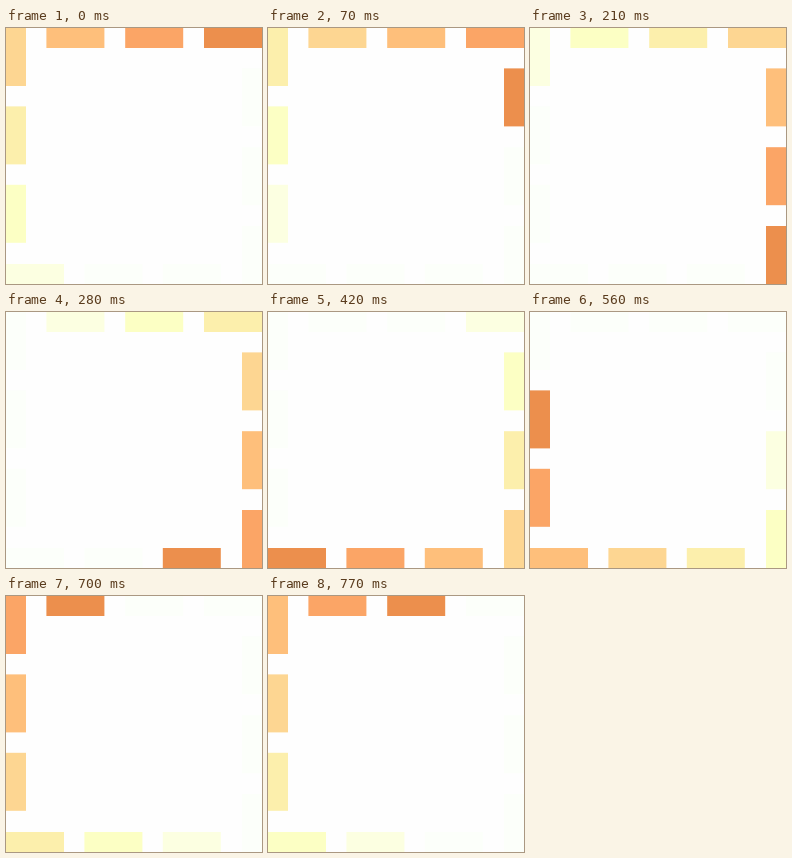
These frames come from a looping animation (256x256 px, 840 ms). An HTML page with a canvas:

```html
<!DOCTYPE html>
<html>
<head>
<meta charset="utf-8">
<style>
  html, body { margin: 0; width: 100%; height: 100%; overflow: hidden; background: #fefefe; }
  canvas { display: block; width: 100%; height: 100%; }
</style>
</head>
<body>
<canvas id="stage" width="256" height="256"></canvas>
<script>
const ctx = document.getElementById('stage').getContext('2d');
const STEP = 70, COUNT = 12, LENGTH = 58, THICK = 20, FAR = 256 - THICK;

// Tail colours, from the leading bar backwards; the rest use the last one.
const tail = ['#ec8f4d', '#fba566', '#febf7b', '#fdd692', '#fcefac', '#fcffc4', '#fcffe1', '#fcfffa'];

// Bars run clockwise from the top side's left end.
const bars = Array.from({ length: COUNT }, (_, i) => {
  const side = Math.floor(i / 3), k = i % 3;
  const start = side < 2 ? 40.4 + 78.8 * k : 78.4 * (2 - k);
  const across = side === 1 || side === 2 ? FAR : 0;
  return side % 2 ? [across, start, THICK, LENGTH] : [start, across, LENGTH, THICK];
});

function draw(time) {
  const head = Math.floor(time / STEP) + 2;
  ctx.fillStyle = '#fefefe';
  ctx.fillRect(0, 0, 256, 256);
  bars.forEach((bar, i) => {
    const age = (head - i + COUNT) % COUNT;
    ctx.fillStyle = tail[Math.min(age, tail.length - 1)];
    ctx.fillRect(...bar);
  });
}

const origin = performance.now();
function tick() {
  draw((performance.now() - origin) % (STEP * COUNT));
  requestAnimationFrame(tick);
}
tick();
</script>
</body>
</html>
```
